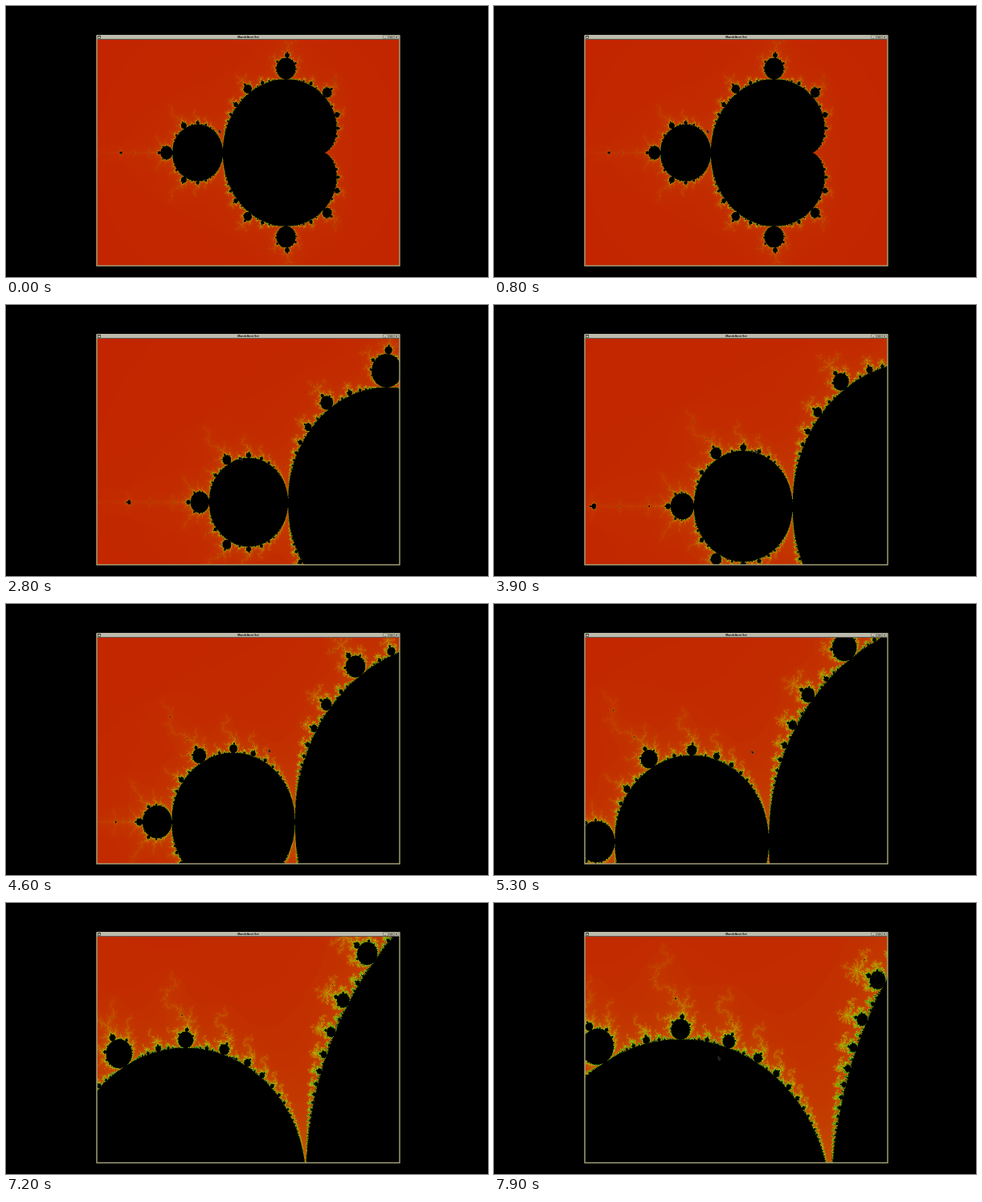
Animation, 600 px wide and 338 px high, one loop 8000 ms. Source, as an HTML page with a canvas:

```html
<!DOCTYPE html>
<html lang="en">
<head>
<meta charset="utf-8">
<title>Mandelbrot Set</title>
<style>
  html, body { margin: 0; width: 100%; height: 100%; overflow: hidden; background: #000; }
  canvas, svg { position: absolute; }
  canvas { left: 113px; top: 42px; }
  svg { left: 0; top: 0; }
  text { font: bold 3.7px "Liberation Sans", Arial, sans-serif; }
</style>
</head>
<body>
<canvas id="view" width="377" height="282"></canvas>
<svg width="600" height="338" viewBox="0 0 600 338">
  <rect x="113" y="37" width="377" height="287" fill="none" stroke="#aaa77c" stroke-width="1.4"/>
  <rect x="113" y="36" width="377" height="5.5" fill="#bdbbac"/>
  <rect x="114" y="37" width="4" height="3.6" fill="#34342c"/>
  <rect x="114.7" y="38.2" width="2.6" height="1.7" fill="#d4d2c6"/>
  <text x="301.5" y="40.2" text-anchor="middle" fill="#111">Mandelbrot Set</text>
  <rect id="button" x="469.5" y="37" width="5.5" height="4" fill="#d0cebf" stroke="#55533f" stroke-width=".5"/>
  <use href="#button" x="7"/>
  <use href="#button" x="14"/>
  <path d="M471 40h2M478 38.2h2.6v1.7h-2.6zM485 38l2.4 2m0-2l-2.4 2"
        fill="none" stroke="#222" stroke-width=".6"/>
  <path id="cursor" d="M0 0V4.5L1.2 3.6L2 5.4L3 3.4Z"
        fill="#111" stroke="#c9c3a0" stroke-width=".3" stroke-opacity=".6"/>
</svg>
<script>
const LOOP = 8000, W = 377, H = 282, LEFT = 113, TOP = 42;
const ZOOM = 1.25, FIRST_CLICK = 1100, CLICK_GAP = 950;
const MAX_ITER = 500, BRIGHTNESS = 194;
const ctx = document.getElementById("view").getContext("2d");
const cursor = document.getElementById("cursor");

// Each click zooms in and makes the clicked point the new centre
const centres = [
  [-0.5, 0], [-0.791, 0.207], [-1.003, 0.286], [-1.036, 0.247], [-0.94, 0.258],
  [-0.856, 0.264], [-0.835, 0.261], [-0.87, 0.247], [-0.9075, 0.235]
];

const scaleAt = level => [W / 3 * ZOOM ** level, H / 2 * ZOOM ** level];

function toStage([re, im], level) {
  const [sx, sy] = scaleAt(level), [cx, cy] = centres[level];
  return [LEFT + W / 2 + (re - cx) * sx, TOP + H / 2 - (im - cy) * sy];
}

function escapeTime(a, b) {
  const b2 = b * b, q = (a - 0.25) ** 2 + b2;
  const inCardioid = q * (q + a - 0.25) <= b2 / 4;
  const inDisc = (a + 1) ** 2 + b2 <= 1 / 16;
  if (inCardioid || inDisc) return MAX_ITER;
  let x = 0, y = 0, n = 0;
  while (n < MAX_ITER) {
    const xx = x * x, yy = y * y;
    if (xx + yy > 4) break;
    y = 2 * x * y + b;
    x = xx - yy + a;
    n++;
  }
  return n;
}

// Hue runs from red through yellow and green as the escape takes longer
function hueColor(n) {
  if (n === MAX_ITER) return [0, 0, 0];
  const hue = Math.min(11 + n * 0.34, 240) / 60;
  return [5, 3, 1].map(k => {
    const d = (k + hue) % 6;
    return BRIGHTNESS * (1 - Math.max(0, Math.min(d, 4 - d, 1)));
  });
}

const palette = Array.from({ length: MAX_ITER + 1 }, (_, n) => hueColor(n));

// Averages four samples for every pixel
function render([re, im], level) {
  const image = new ImageData(W, H), data = image.data;
  const [sx, sy] = scaleAt(level);
  for (let py = 0, i = 0; py < H; py++) {
    for (let px = 0; px < W; px++, i += 4) {
      for (let ch = 0; ch < 3; ch++) data[i + ch] = 0;
      let r = 0, g = 0, b = 0;
      for (let s = 0; s < 4; s++) {
        const x = px + 0.25 + (s & 1) / 2, y = py + 0.25 + (s >> 1) / 2;
        const c = palette[escapeTime(re + (x - W / 2) / sx, im - (y - H / 2) / sy)];
        r += c[0]; g += c[1]; b += c[2];
      }
      data[i] = r / 4;
      data[i + 1] = g / 4;
      data[i + 2] = b / 4;
      data[i + 3] = 255;
    }
  }
  return image;
}

const images = centres.map(render);
let shown = -1;

// The pointer eases from the last clicked place to the next one
function pointerAt(level, progress) {
  const last = centres.length - 1;
  const from = toStage(centres[Math.max(level, 1)], Math.max(level - 1, 0));
  const to = level < last ? toStage(centres[level + 1], level) : from;
  const e = progress * progress * (3 - 2 * progress);
  return from.map((v, i) => v + (to[i] - v) * e);
}

function draw(t) {
  const clicks = Math.max(0, (t - FIRST_CLICK) / CLICK_GAP + 1);
  const level = Math.floor(clicks);
  if (level !== shown) ctx.putImageData(images[shown = level], 0, 0);
  cursor.setAttribute("transform", `translate(${pointerAt(level, clicks - level)})`);
}

const start = performance.now();
function tick() {
  draw((performance.now() - start) % LOOP);
  requestAnimationFrame(tick);
}
tick();
</script>
</body>
</html>
```
